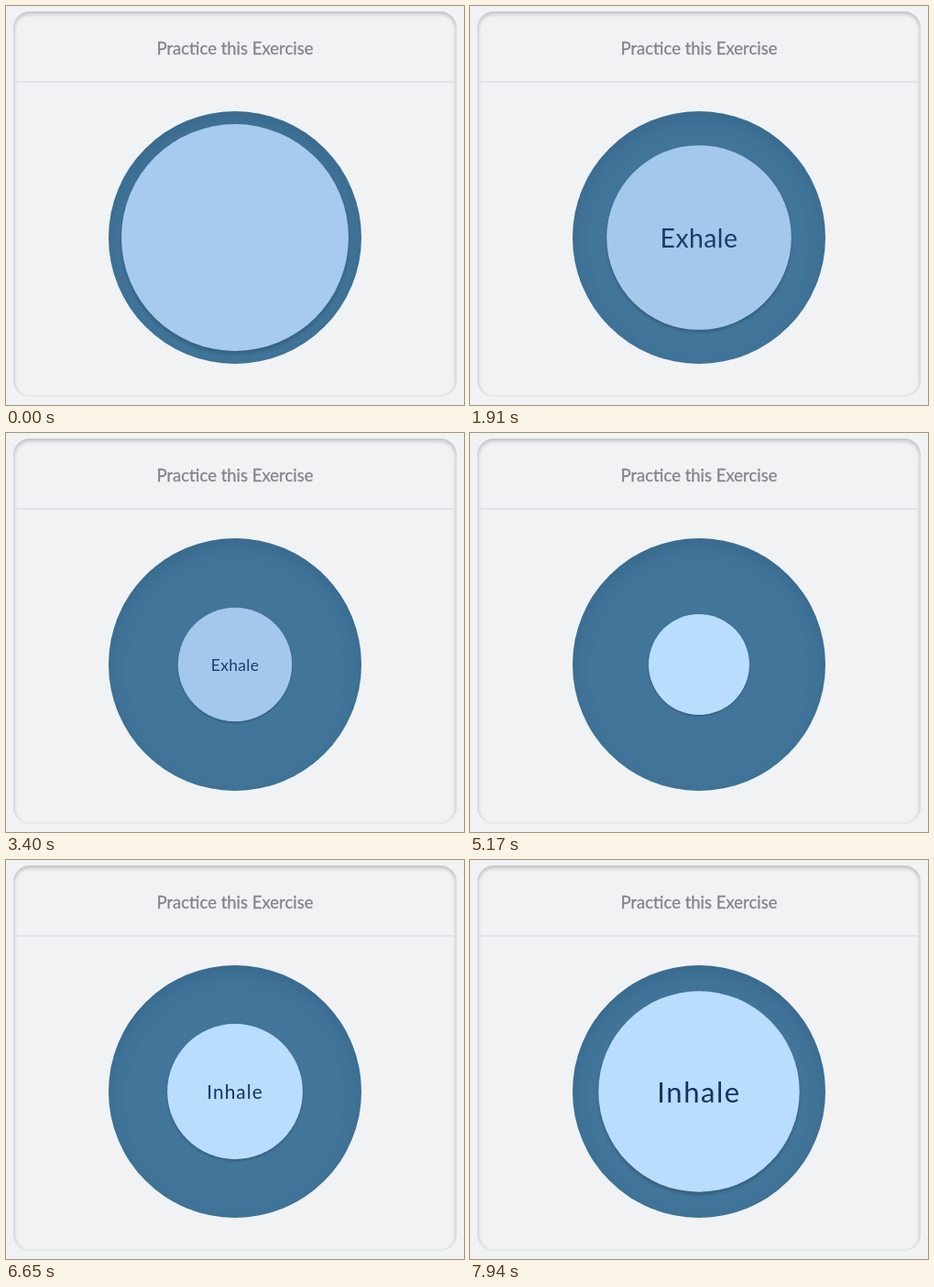
Recreate the animation shown at these times as an HTML page. Size 500 by 436 pixels, loop 8 s.

```html
<!DOCTYPE html>
<html lang="en">
<head>
<meta charset="utf-8">
<title>Breathing exercise</title>
<style>
  html, body { margin: 0; width: 100%; height: 100%; overflow: hidden; background: #f0f2f4; }
  body { position: relative; font-family: Lato, sans-serif; }
  body * { position: absolute; box-sizing: border-box; }
  .card {
    left: 8px; top: 6px; width: 484px; height: 421px; border-radius: 18px; background: #f0f2f4;
    box-shadow: inset 0 2px 4px 1px rgba(0, 0, 0, .2);
  }
  h1 {
    left: 0; top: 27px; width: 100%; margin: 0; text-align: center;
    font-size: 18.5px; line-height: 26px; font-weight: 400; color: #82858a;
    -webkit-text-stroke: .3px #82858a;
  }
  .divider { left: 2px; right: 2px; top: 76px; height: 2px; background: #e2e5e7; }
  .ring {
    left: 112px; top: 115px; width: 276px; height: 276px; border-radius: 50%; background: #417599;
    box-shadow: inset 0 8px 18px rgba(35, 80, 115, .3);
  }
  .disc {
    left: 126px; top: 129px; width: 248px; height: 248px; border-radius: 50%;
    box-shadow: 0 3px 4px rgba(0, 0, 0, .2);
  }
  .word { inset: 0; text-align: center; font-size: 35px; line-height: 248px; }
  #exhale { color: #173f66; letter-spacing: .015em; }
  #inhale { color: #12335f; letter-spacing: .05em; }
</style>
</head>
<body>
<div class="card">
  <h1>Practice this Exercise</h1>
  <div class="divider"></div>
</div>
<div class="ring"></div>
<div class="disc" id="disc">
  <div class="word" id="exhale">Exhale</div>
  <div class="word" id="inhale">Inhale</div>
</div>
<script>
const LOOP = 8000, BREATH = 4000, HOLD = 900, FADE = 300;
const EXHALE_START = 300, INHALE_START = EXHALE_START + BREATH + HOLD;
const MIN_SCALE = 55 / 124;
const EXHALE_COLOR = [163, 200, 236], INHALE_COLOR = [185, 221, 255];

const [disc, exhale, inhale] = ["disc", "exhale", "inhale"].map(id => document.getElementById(id));
const progress = (t, start, length) => Math.min(1, Math.max(0, (t - start) / length));
const mix = (a, b, k) => a + (b - a) * k;
const easeOut = p => 1 - (1 - p) ** 1.8;

// Equivalent to cubic-bezier(.42, 0, .58, 1)
function easeInOut(p) {
  let low = 0, high = 1, s = .5;
  for (let i = 0; i < 20; i++) {
    const x = 1.26 * s * (1 - s) ** 2 + 1.74 * s * s * (1 - s) + s ** 3;
    if (x < p) low = s; else high = s;
    s = (low + high) / 2;
  }
  return s * s * (3 - 2 * s);
}

function draw(t) {
  const shrink = easeInOut(progress(t, EXHALE_START, BREATH));
  const grow = easeInOut(progress(t, INHALE_START, BREATH));
  disc.style.transform = `scale(${mix(1, MIN_SCALE, shrink - grow)})`;

  const toInhale = t < EXHALE_START + BREATH
    ? 1 - easeOut(progress(t, EXHALE_START - HOLD, HOLD))
    : easeOut(progress(t, INHALE_START - HOLD, HOLD));
  disc.style.background = `rgb(${EXHALE_COLOR.map((c, i) => mix(c, INHALE_COLOR[i], toInhale))})`;

  exhale.style.opacity = progress(t, EXHALE_START, FADE) - progress(t, EXHALE_START + BREATH, FADE);
  inhale.style.opacity = progress(t, INHALE_START, FADE);
}

let start;
function tick(now) {
  start ??= now;
  draw((now - start) % LOOP);
  requestAnimationFrame(tick);
}
draw(0);
requestAnimationFrame(tick);
</script>
</body>
</html>
```
